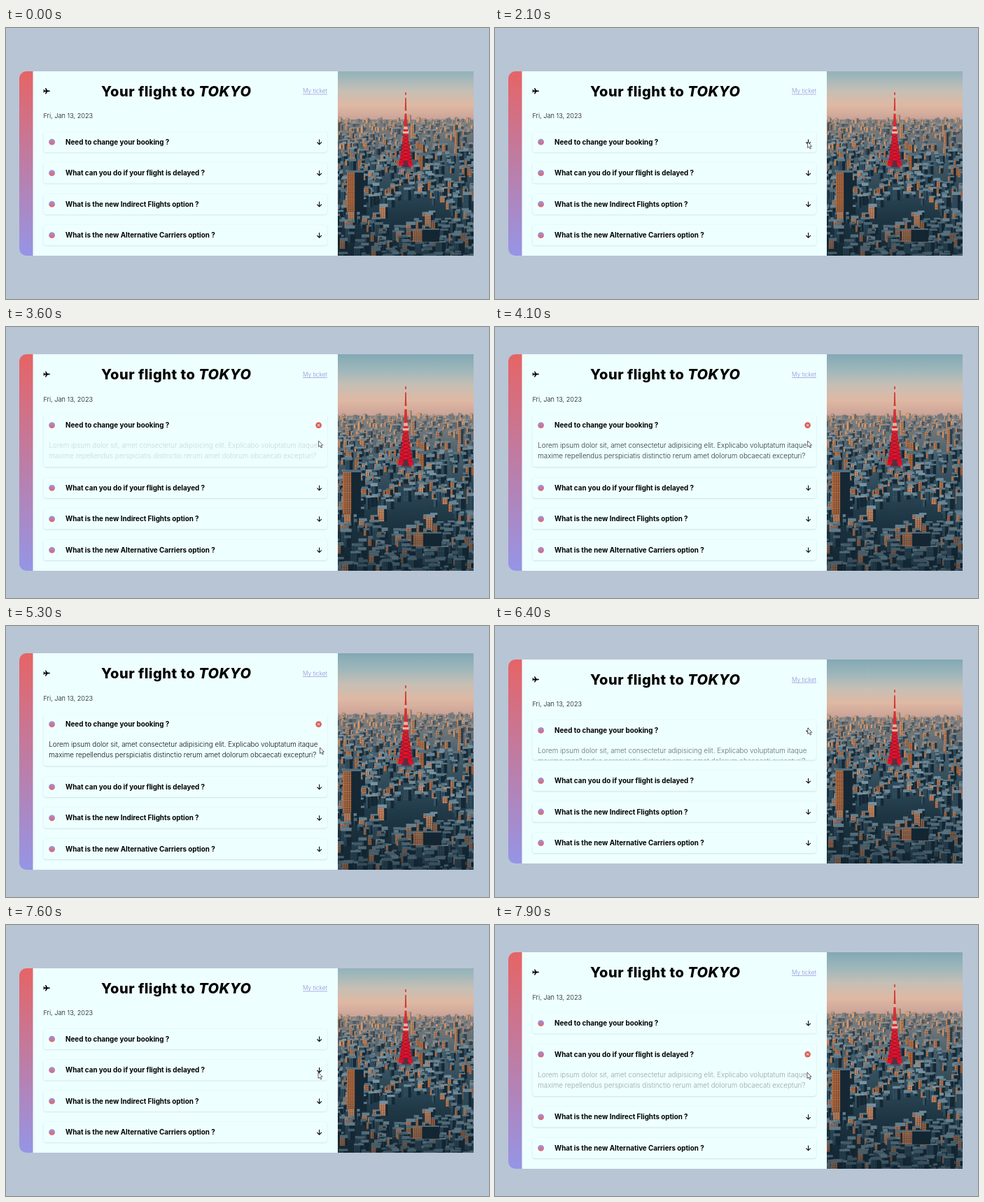
Animation of 690x388 px, one loop 8000 ms. Source, as an HTML page with a canvas:

```html
<!DOCTYPE html>
<html lang="en">
<head>
<meta charset="utf-8">
<title>Flight to Tokyo</title>
<style>
  html, body { margin: 0; width: 100%; height: 100%; overflow: hidden; background: #b8c5d5; }
  canvas { display: block; width: 690px; height: 388px; }
</style>
</head>
<body>
<canvas id="stage" width="690" height="388"></canvas>
<script>
const ctx = document.getElementById('stage').getContext('2d');
const LOOP = 8000;
const FONT = 'Inter, "Open Sans", sans-serif';
const BACKDROP = '#b8c5d5', PANEL = '#eeffff', RED = '#e66465', VIOLET = '#9595e6';
const CENTER_Y = 194, CLOSED_H = 264, EXTRA_H = 45.2;
const ITEM_H = 29.6, PITCH = 44.5;
const GROW_MS = 120, FADE_MS = 740;
const PHOTO = { x: 474, w: 194, h: 290, horizon: 82, res: 2 };

const QUESTIONS = [
  'Need to change your booking ?',
  'What can you do if your flight is delayed ?',
  'What is the new Indirect Flights option ?',
  'What is the new Alternative Carriers option ?'
];
const ANSWER = [
  'Lorem ipsum dolor sit, amet consectetur adipisicing elit. Explicabo voluptatum itaque',
  'maxime repellendus perspiciatis distinctio rerum amet dolorum obcaecati excepturi?'
];
// Clicks that open and close an item, in ms.
const OPENINGS = [
  { item: 0, from: 3480, to: 6350 },
  { item: 1, from: 7620, to: Infinity }
];
// The pointer appears, then rests between these moves.
const ENTRY = { at: 700, x: 168, y: 178 };
const MOVES = [
  { at: 700, ms: 200, x: 196, y: 178 },
  { at: 1000, ms: 200, x: 400, y: 148 },
  { at: 1200, ms: 100, x: 474, y: 164 },
  { at: 1500, ms: 100, x: 477, y: 167 },
  { at: 1600, ms: 500, x: 446.6, y: 163 },
  { at: 5050, ms: 250, x: 448.5, y: 174 },
  { at: 5500, ms: 500, x: 446.8, y: 146 },
  { at: 6850, ms: 450, x: 446, y: 211 }
];

const clamp = v => Math.max(0, Math.min(1, v));
const smooth = v => { v = clamp(v); return v * v * (3 - 2 * v); };
const mix = (a, b, k) => a + (b - a) * k;
const blend = (a, b, k) => `rgb(${a.map((v, i) => Math.round(mix(v, b[i], k)))})`;

function randomizer(seed) {
  return () => (seed = (seed * 16807) % 2147483647) / 2147483647;
}
function vertical(c, y0, y1, ...colors) {
  const g = c.createLinearGradient(0, y0, 0, y1);
  colors.forEach((col, i) => g.addColorStop(i / (colors.length - 1), col));
  return g;
}
function polygon(c, points, fill) {
  c.beginPath();
  points.forEach(([x, y]) => c.lineTo(x, y));
  c.closePath();
  c.fillStyle = fill;
  c.fill();
}
function disc(x, y, r, fill) {
  ctx.beginPath();
  ctx.arc(x, y, r, 0, 7);
  ctx.fillStyle = fill;
  ctx.fill();
}
function line(c, color, width, ...points) {
  c.beginPath();
  points.forEach(([x, y]) => c.lineTo(x, y));
  c.strokeStyle = color;
  c.lineWidth = width;
  c.stroke();
}
function label(str, x, y, font, color, spacing = 0) {
  ctx.font = font + ' ' + FONT;
  ctx.letterSpacing = spacing + 'px';
  ctx.fillStyle = color;
  ctx.fillText(str, x, y);
  return ctx.measureText(str).width;
}

// A block seen from above: sunlit or shaded left wall, dark right wall, pale roof.
function building(c, x, top, w, h, near, lit, rnd) {
  const split = w * mix(0.35, 0.75, rnd()), glow = 40 * rnd();
  const roof = mix(0.6, 3, near) * (0.6 + rnd());
  c.fillStyle = blend([112, 118, 122], [22, 42, 55], near);
  c.fillRect(x, top, w, h);
  c.fillStyle = lit
    ? blend([222, 160, 112], [185 + glow, 108 + glow, 62 + glow], near)
    : blend([128, 131, 134], [54, 84, 101], near);
  c.fillRect(x, top, split, h);
  c.fillStyle = blend([165, 150, 142], [82 + glow, 108 + glow, 122 + glow], near);
  c.fillRect(x, top - roof, w, roof);
  if (w < 5) return;
  c.fillStyle = 'rgba(20,34,46,.38)';
  for (let y = top + 1.6; y < top + h - 1; y += 2.4) c.fillRect(x + 0.5, y, w - 1, 0.9);
  for (let dx = 2.5; dx < w - 1; dx += 3) c.fillRect(x + dx, top, 0.6, h);
}

function drawTower(c) {
  const mid = 97, tip = 43, base = 150;
  const half = y => 0.8 + 9.8 * Math.pow((y - tip) / (base - tip), 2.2);
  for (let y = tip; y < base; y += 0.5) {
    const pale = y < 100 && Math.sin((y - tip) / 3.6) > 0.86;
    c.fillStyle = pale ? '#e4b3a6' : blend([205, 68, 58], [222, 30, 48], (y - tip) / 70);
    c.fillRect(mid - half(y), y, half(y) * 2, 0.6);
  }
  c.fillStyle = '#ecb4a2';
  c.fillRect(mid - 4.2, 99, 8.4, 3.2);
  for (let y = 104; y < base - 6; y += 5) {
    for (const s of [-1, 1])
      line(c, 'rgba(80,22,42,.55)', 0.7, [mid + s * half(y), y], [mid - s * half(y + 5), y + 5]);
  }
  polygon(c, [[mid - 5, base], [mid - 2, base - 9], [mid + 2, base - 9], [mid + 5, base]], '#5a2e3c');
}

function makePhoto() {
  const canvas = document.createElement('canvas');
  canvas.width = PHOTO.w * PHOTO.res;
  canvas.height = PHOTO.h * PHOTO.res;
  const c = canvas.getContext('2d');
  const rnd = randomizer(4127);
  c.scale(PHOTO.res, PHOTO.res);
  c.fillStyle = vertical(c, 0, PHOTO.horizon, '#83a9b5', '#9db7bb', '#c6bfb5', '#dfb9a3', '#cba398');
  c.fillRect(0, 0, PHOTO.w, PHOTO.horizon + 1);
  c.fillStyle = vertical(c, PHOTO.horizon, PHOTO.h, '#8b8580', '#4a606c', '#294453', '#1d3543', '#182c38');
  c.fillRect(0, PHOTO.horizon, PHOTO.w, PHOTO.h);

  const count = 1050;
  let towerDrawn = false;
  for (let i = 0; i < count; i++) {
    const u = i / count, base = PHOTO.horizon + 3 + 225 * Math.pow(u, 1.55);
    if (!towerDrawn && base > 150) { drawTower(c); towerDrawn = true; }
    const near = clamp((base - PHOTO.horizon) / 60);
    const size = mix(3, 10, u) * (0.55 + rnd());
    const tall = mix(0.6, 1.6, rnd()) * (rnd() > 0.93 ? 2 : 1);
    const x = rnd() * (PHOTO.w + 10) - 8;
    const park = Math.hypot((x - 95) / 62, (base - 222) / 22) < 1;
    const lit = rnd() < mix(0.6, 0.24, u);
    if (!park || rnd() < 0.15) building(c, x, base - size * tall, size, size * tall, near, lit, rnd);
  }
  building(c, 13, 158, 24, 56, 1, true, rnd);
  building(c, 107, 240, 38, 17, 1, true, rnd);
  c.fillStyle = vertical(c, 200, PHOTO.h, 'rgba(15,32,43,0)', 'rgba(15,32,43,.5)');
  c.fillRect(0, 200, PHOTO.w, 90);
  return canvas;
}
const photo = makePhoto();

function drawPhoto(top, height) {
  const scale = Math.max(1, height / PHOTO.h);
  const w = PHOTO.w * scale, h = PHOTO.h * scale;
  ctx.save();
  ctx.beginPath();
  ctx.rect(PHOTO.x, top, PHOTO.w, height);
  ctx.clip();
  ctx.drawImage(photo, PHOTO.x + (PHOTO.w - w) / 2, CENTER_Y - h / 2, w, h);
  ctx.restore();
}

function drawPlane(x, y) {
  ctx.fillStyle = '#000';
  ctx.beginPath();
  ctx.ellipse(x, y, 4.8, 1, 0, 0, 7);
  ctx.fill();
  for (const s of [-1, 1]) {
    polygon(ctx, [[x + 1.6, y], [x - 1, y + s * 4.2], [x - 2.2, y + s * 4.2], [x - 1, y]], '#000');
    polygon(ctx, [[x - 2.6, y], [x - 3.9, y + s * 2.2], [x - 4.8, y + s * 2.2], [x - 4.1, y]], '#000');
  }
}
function drawArrow(x, y) {
  line(ctx, '#111', 1.15, [x, y - 3.6], [x, y + 3.3]);
  line(ctx, '#111', 1.15, [x - 3.2, y + 0.3], [x, y + 3.4], [x + 3.2, y + 0.3]);
}
function drawClose(x, y) {
  disc(x, y, 4.3, '#dc605c');
  for (const s of [-1.5, 1.5]) line(ctx, '#fff', 1, [x - s, y - 1.5], [x + s, y + 1.5]);
}
function drawPointer(x, y) {
  const shape = [[0, 0], [0, 8.6], [2, 6.9], [3.4, 10], [4.9, 9.3], [3.5, 6.4], [6, 6.2]];
  polygon(ctx, shape.map(([px, py]) => [x + px, y + py]), '#fff');
  ctx.strokeStyle = '#33373b';
  ctx.lineWidth = 0.8;
  ctx.stroke();
}

function pointerAt(t) {
  return MOVES.reduce((p, move) => {
    const k = smooth((t - move.at) / move.ms);
    return { x: mix(p.x, move.x, k), y: mix(p.y, move.y, k) };
  }, ENTRY);
}

function itemState(index, t) {
  const span = OPENINGS.find(o => o.item === index);
  if (!span) return { open: false, grow: 0, fade: 0 };
  const opening = t - span.from, closing = t - span.to;
  const shrink = 1 - smooth(closing / GROW_MS);
  return {
    open: opening >= 0 && closing < 0,
    grow: smooth(opening / GROW_MS) * shrink,
    fade: clamp(opening / FADE_MS) * shrink
  };
}

function drawItem(index, y, state) {
  const h = ITEM_H + EXTRA_H * state.grow, mid = y + ITEM_H / 2;
  ctx.save();
  ctx.shadowColor = 'rgba(40,75,90,.2)';
  ctx.shadowBlur = 2;
  ctx.shadowOffsetY = 0.6;
  ctx.beginPath();
  ctx.roundRect(53.5, y, 405.5, h, 4);
  ctx.fillStyle = PANEL;
  ctx.fill();
  ctx.restore();

  disc(65.6, mid, 4.4, vertical(ctx, mid - 4.4, mid + 4.4, VIOLET, RED));
  label(QUESTIONS[index], 85, mid + 3.5, '700 9.8px', '#000');
  if (state.open) drawClose(446.6, mid);
  else drawArrow(447.6, mid);

  if (state.fade > 0) {
    ctx.save();
    ctx.beginPath();
    ctx.rect(53, y, 406, h);
    ctx.clip();
    ctx.globalAlpha = state.fade;
    ANSWER.forEach((text, i) => label(text, 61.3, y + 47.6 + i * 14.8, '300 9.8px', '#0c1012'));
    ctx.restore();
  }
}

function draw(t) {
  const states = QUESTIONS.map((_, i) => itemState(i, t));
  const grown = EXTRA_H * states.reduce((sum, s) => sum + s.grow, 0);
  const top = CENTER_Y - (CLOSED_H + grown) / 2;
  const edge = Math.round(top), height = 2 * (CENTER_Y - edge);

  ctx.fillStyle = BACKDROP;
  ctx.fillRect(0, 0, 690, 388);
  ctx.beginPath();
  ctx.roundRect(19, edge, 20, height, [10, 0, 0, 10]);
  ctx.fillStyle = vertical(ctx, edge, edge + height, RED, VIOLET);
  ctx.fill();
  ctx.fillStyle = PANEL;
  ctx.fillRect(38.5, edge, 435.5, height);
  drawPhoto(edge, height);

  drawPlane(58.2, top + 28.2);
  const lead = label('Your flight to ', 136, top + 36, '800 20px', '#000', 0.5);
  label('TOKYO', 136 + lead, top + 36, 'italic 800 20px', '#000', 0.5);
  const link = label('My ticket', 424, top + 31.4, '300 8.3px', '#8f8fd8');
  ctx.fillRect(424, top + 32.6, link, 0.7);
  label('Fri, Jan 13, 2023', 53.5, top + 67.2, '300 9.2px', '#111');

  let y = top + 86.4;
  states.forEach((state, i) => {
    drawItem(i, y, state);
    y += PITCH + EXTRA_H * state.grow;
  });
  if (t >= ENTRY.at) {
    const { x, y } = pointerAt(t);
    drawPointer(x, y);
  }
}

const start = performance.now();
function tick() {
  draw((performance.now() - start) % LOOP);
  requestAnimationFrame(tick);
}
tick();
</script>
</body>
</html>
```
